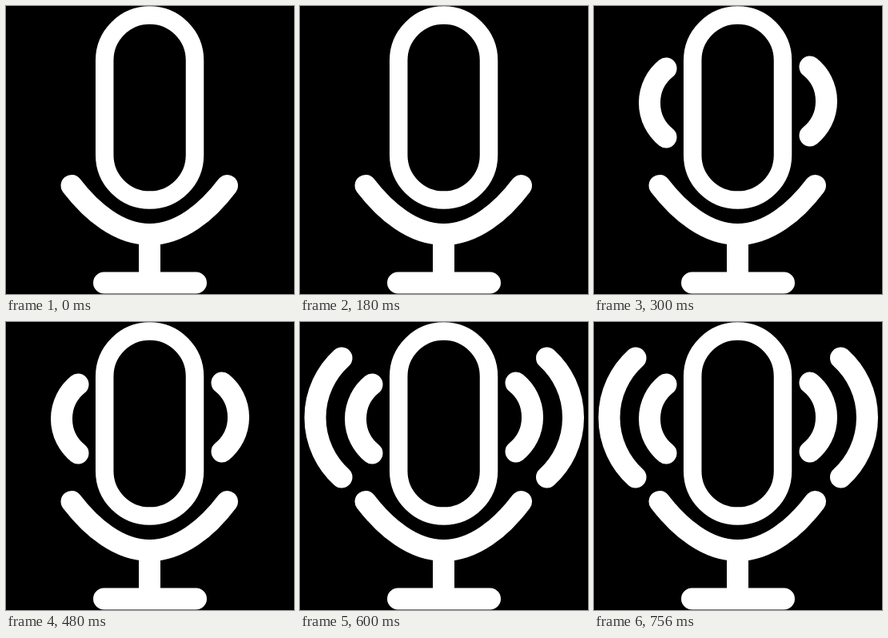
An HTML page for the animation above (0.86 s loop, 360 by 360 pixels).

```html
<!DOCTYPE html>
<html lang="en">
<head>
<meta charset="utf-8">
<title>Microphone</title>
<style>
  html, body { margin: 0; width: 100%; height: 100%; overflow: hidden; background: #000; }
  svg { display: block; width: 100vw; height: 100vh; }
  .line { fill: none; stroke: #fff; stroke-width: 27; stroke-linecap: round; }
  .capsule { stroke-width: 22.5; }
  .wave { visibility: hidden; }
</style>
</head>
<body>
<svg viewBox="0 0 360 360">
  <g class="line">
    <rect class="capsule" x="123.2" y="11.6" width="112.8" height="231" rx="56.4"/>
    <path d="M82 224.5C107 257 141 285.5 179.5 285.5S252 257 276.5 224.5"/>
    <path d="M179.5 286V346M122.5 346H237.5"/>
    <path class="wave" d="M90 78A55.3 55.3 0 0 0 90 164M270 76A55.3 55.3 0 0 1 270 162"/>
    <path class="wave" d="M52 45A100.6 100.6 0 0 0 52 194M308.5 45A100.6 100.6 0 0 1 308.5 194"/>
  </g>
</svg>
<script>
  const LOOP = 860;
  const starts = [300, 600];
  const waves = document.querySelectorAll('.wave');
  const begin = performance.now();

  function draw() {
    const time = (performance.now() - begin) % LOOP;
    waves.forEach((wave, i) => {
      wave.style.visibility = time >= starts[i] ? 'visible' : 'hidden';
    });
    requestAnimationFrame(draw);
  }
  draw();
</script>
</body>
</html>
```
